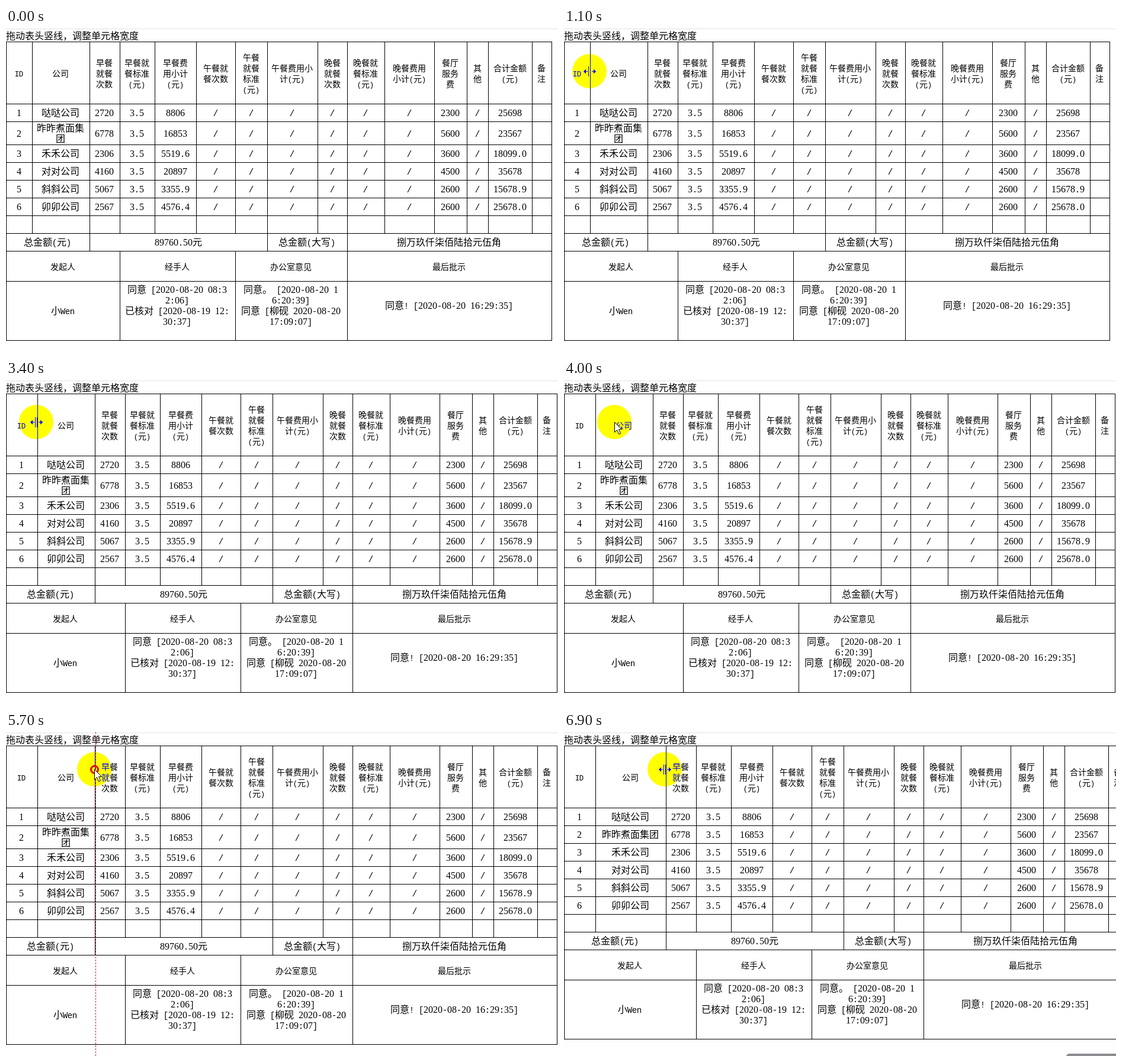
Animation of 932x548 px, one loop 8000 ms. Source, as an HTML page with a canvas:

```html
<!DOCTYPE html>
<html lang="zh-CN">
<head>
<meta charset="utf-8">
<title>拖动表头竖线</title>
<style>
  html, body { margin: 0; width: 100%; height: 100%; overflow: hidden; background: #fff; }
  canvas { display: block; }
</style>
</head>
<body>
<canvas id="stage" width="932" height="548"></canvas>
<script>
const W = 932, H = 548, LOOP = 8000, STEP = 100;
const ctx = document.getElementById('stage').getContext('2d');
const CJK = '"Noto Sans CJK SC", "Noto Sans CJK", "Noto Sans CJK JP", sans-serif';
const MONO = '"Liberation Mono", "DejaVu Sans Mono", monospace';
const DIGITS = '"Liberation Serif", "Noto Serif", serif';

const COLUMNS = [
  ['ID', 44], ['公司', 97], ['早餐|就餐|次数', 51], ['早餐就|餐标准|(元)', 59],
  ['早餐费|用小计|(元)', 70], ['午餐就|餐次数', 66], ['午餐|就餐|标准|(元)', 54],
  ['午餐费用小|计(元)', 85], ['晚餐|就餐|次数', 50], ['晚餐就|餐标准|(元)', 63],
  ['晚餐费用|小计(元)', 84], ['餐厅|服务|费', 55], ['其|他', 36],
  ['合计金额|(元)', 74], ['备|注', 33]
];
// company, meals, subtotal, service fee, total
const DATA = [
  '哒哒公司 2720 8806 2300 25698',
  '昨昨煮面集团 6778 16853 5600 23567',
  '禾禾公司 2306 5519.6 3600 18099.0',
  '对对公司 4160 20897 4500 35678',
  '斜斜公司 5067 3355.9 2600 15678.9',
  '卯卯公司 2567 4576.4 2600 25678.0'
].map(s => s.split(' '));
const SUMS = ['总金额(元)', '89760.50元', '总金额(大写)', '捌万玖仟柒佰陆拾元伍角'];
const ROLES = ['发起人', '经手人', '办公室意见', '最后批示'];
const NOTES = ['小Wen',
  '同意 [2020-08-20 08:3|2:06]|已核对 [2020-08-19 12:|30:37]',
  '同意。 [2020-08-20 1|6:20:39]|同意 [柳砚 2020-08-20|17:09:07]',
  '同意! [2020-08-20 16:29:35]'];

// Each drag widens one column by the given amount on release.
const DRAGS = [
  { press: 2000, release: 3400, column: 0, grow: 9 },
  { press: 5000, release: 6600, column: 1, grow: 22 }
];
const ORIGIN = { x: 227, y: 61 };
const MOVES = [
  { from: 100, to: 875, x: 44, y: 72 },
  { from: 2200, to: 2400, x: 36, y: 72 },
  { from: 2400, to: 2600, x: 48, y: 71 },
  { from: 2600, to: 3100, x: 51, y: 71 },
  { from: 3600, to: 3800, x: 45, y: 77 },
  { from: 3800, to: 4300, x: 146, y: 63 },
  { from: 5200, to: 5500, x: 154, y: 63 },
  { from: 5600, to: 5800, x: 144, y: 63 },
  { from: 5800, to: 6400, x: 177, y: 63 },
  { from: 6400, to: 6500, x: 170, y: 63 }
];

const progress = (t, a, b) => Math.min(1, Math.max(0, (t - a) / (b - a)));

function pointerAt(t) {
  let { x, y } = ORIGIN;
  for (const m of MOVES) {
    const p = progress(t, m.from, m.to);
    x += (m.x - x) * p;
    y += (m.y - y) * p;
  }
  // one small loop while settling on the first border
  const sway = Math.sin(2 * Math.PI * progress(t, 875, 1350));
  return [Math.round(x - 7 * sway), Math.round(y + 6 * sway)];
}

const isWide = c => c.charCodeAt(0) > 255;
const advance = (c, size) => isWide(c) ? size : size / 2;

function fontFor(c, size) {
  if (isWide(c)) return `300 ${size}px ${CJK}`;
  return /\d/.test(c) ? `${size}px ${DIGITS}` : `${size * 0.88}px ${MONO}`;
}

// Full-width characters take one em, the rest half an em.
function drawLine(str, cx, cy, size) {
  const chars = [...str];
  const width = chars.reduce((w, c) => w + advance(c, size), 0);
  let x = Math.floor(cx - width / 2);
  const y = Math.round(cy + size * 0.37);
  for (const c of chars) {
    const w = advance(c, size);
    ctx.font = fontFor(c, size);
    ctx.fillText(c, x + w / 2, y);
    x += w;
  }
}

function drawText(str, cx, cy, size) {
  const lines = str.split('|');
  lines.forEach((s, i) => drawLine(s, cx, cy + (i - (lines.length - 1) / 2) * 18, size));
}

function edges(sizes, start) {
  const out = [start];
  for (const s of sizes) out.push(out[out.length - 1] + s);
  return out;
}

function drawTable(xs) {
  const wraps = xs[2] - xs[1] < 100;
  const ys = edges([105, 30, wraps ? 39 : 30, ...Array(6).fill(30), 51, 100], 23);
  const mid = r => (ys[r] + ys[r + 1]) / 2;
  const all = xs.map((_, i) => i);
  const sumCols = [0, 2, 7, 9, 15], noteCols = [0, 3, 6, 9, 15];

  ctx.fillStyle = '#000';
  for (const y of ys) ctx.fillRect(0, y, xs[15] + 1, 1);
  const verticals = (cols, a, b) => cols.forEach(c => ctx.fillRect(xs[c], ys[a], 1, ys[b] - ys[a]));
  verticals(all, 0, 8);
  verticals(sumCols, 8, 9);
  verticals(noteCols, 9, 11);

  const row = (cells, cols, cy, size) => cells.forEach((s, i) =>
    drawText(s, (xs[cols[i]] + xs[cols[i + 1]]) / 2, cy, size));

  row(COLUMNS.map(c => c[0]), all, mid(0) + 1.5, 14);
  DATA.forEach(([name, meals, cost, fee, total], i) => {
    const label = wraps && name.length > 5 ? name.slice(0, 5) + '|' + name.slice(5) : name;
    row([String(i + 1), label, meals, '3.5', cost, ...'//////', fee, '/', total],
      all, mid(i + 1) + 0.5, 16);
  });
  row(SUMS, sumCols, mid(8) + 0.5, 16);
  row(ROLES, noteCols, mid(9) + 1.5, 14);
  row(NOTES.slice(0, 1), noteCols, mid(10) + 0.5, 16);
  row(NOTES.slice(1), noteCols.slice(1), mid(10) - 9, 16);
}

function drawSpot(x, y) {
  ctx.globalCompositeOperation = 'difference';
  ctx.fillStyle = '#00f';
  ctx.beginPath();
  ctx.arc(x, y, 29, 0, Math.PI * 2);
  ctx.fill();
  ctx.globalCompositeOperation = 'source-over';
}

function drawResize(x, y) {
  ctx.fillStyle = '#000';
  ctx.fillRect(x - 2, y - 8, 1, 17);
  ctx.fillRect(x + 1, y - 8, 1, 17);
  for (const s of [-1, 1]) {
    for (let i = 0; i < 7; i++) {
      const h = i < 4 ? i : 0;
      ctx.fillRect(x + s * (10 - i), y - h, 1, 2 * h + 1);
    }
  }
}

function drawArrow(x, y) {
  ctx.fillStyle = '#fff';
  ctx.strokeStyle = '#000';
  ctx.lineWidth = 1;
  const shape = new Path2D('M.5 .5v17l4-4 3 7 3-1-3-7h5z');
  ctx.save();
  ctx.translate(x, y);
  ctx.fill(shape);
  ctx.stroke(shape);
  ctx.restore();
}

function drawRing(x, y) {
  ctx.strokeStyle = '#e60012';
  ctx.lineWidth = 3;
  ctx.beginPath();
  ctx.arc(x + 0.5, y + 0.5, 6, 0, Math.PI * 2);
  ctx.stroke();
}

function drawGuide(x) {
  ctx.fillStyle = '#e0202c';
  for (let y = 0; y < H; y += 5) ctx.fillRect(x, y, 1, 3);
}

function drawScrollbar(alpha) {
  ctx.globalAlpha = alpha;
  ctx.fillStyle = '#8b8d91';
  ctx.beginPath();
  ctx.roundRect(848, 544, 100, 10, 5);
  ctx.fill();
  ctx.globalAlpha = 1;
}

function render(t) {
  ctx.fillStyle = '#fff';
  ctx.fillRect(0, 0, W, H);
  ctx.fillStyle = '#e4e4e4';
  ctx.fillRect(0, 1, W, 1);
  ctx.textAlign = 'center';
  ctx.fillStyle = '#000';
  drawLine('拖动表头竖线，调整单元格宽度', 112, 13, 16);

  const widths = COLUMNS.map(c => c[1]);
  for (const d of DRAGS) if (t >= d.release) widths[d.column] += d.grow;
  const xs = edges(widths, 0);
  drawTable(xs);
  drawScrollbar(progress(t, 6500, 6900));

  if (t < MOVES[0].from) return;
  const [x, y] = pointerAt(t);
  const drag = DRAGS.find(d => t >= d.press && t < d.release);
  const guided = drag && t > drag.press;
  const onEdge = !guided && xs.some(e => Math.abs(e - x) < 8);
  if (onEdge) drawResize(x, y);
  drawSpot(x, y);
  if (guided) drawGuide(x + 2);
  if (drag) drawRing(x, y);
  if (!onEdge) drawArrow(x, y);
}

const start = performance.now();
let shown = -1;
function tick() {
  const t = Math.floor(((performance.now() - start) % LOOP) / STEP) * STEP;
  if (t !== shown) {
    shown = t;
    render(t);
  }
  requestAnimationFrame(tick);
}
render(0);
requestAnimationFrame(tick);
</script>
</body>
</html>
```
